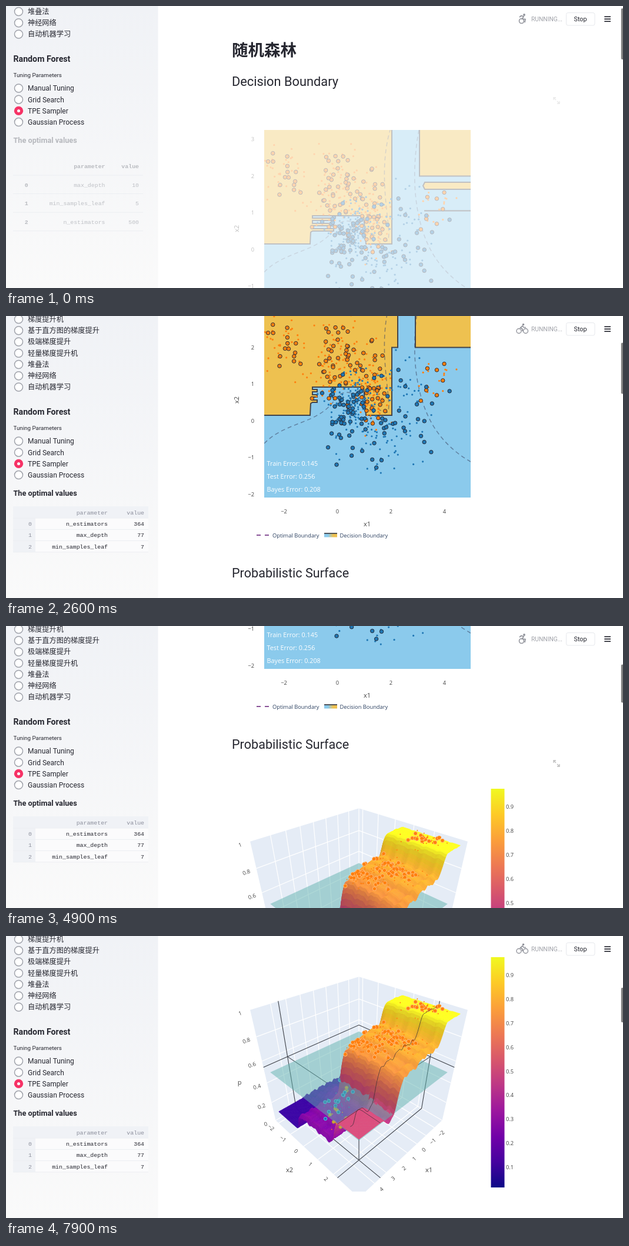
Write an HTML page with a canvas that moves like this. It is 1049 by 480 pixels and loops after 8000 ms.

```html
<!DOCTYPE html>
<html lang="zh-CN">
<head>
<meta charset="utf-8">
<title>Random Forest</title>
<style>
html, body { margin: 0; width: 100%; height: 100%; overflow: hidden; background: #fff; }
canvas { display: block; }
</style>
</head>
<body>
<canvas id="stage" width="1049" height="480"></canvas>
<script>
const W = 1049, H = 480, LOOP = 8000;
const INK = '#262730', ORANGE = '#ff7f0e', BLUE = '#1f77b4', SKY = '#8bcaec', SAND = '#eec150', EDGE = '#43454b';
const SANS = 'Roboto, sans-serif';
const PLOT = '"Open Sans", sans-serif';
const MONO = '"Liberation Mono", monospace';
const CJK = '"Noto Sans CJK SC", "Noto Sans CJK", sans-serif';
const SMALL = '9.3px ' + PLOT, AXIS = '11px ' + PLOT, LABEL = '#444';
const TAU = Math.PI * 2;
const stage = document.getElementById('stage').getContext('2d');

function layer(height) {
  const c = document.createElement('canvas');
  c.width = W;
  c.height = height;
  return c.getContext('2d');
}

function text(g, s, x, y, font, color = INK, align = 'left', angle = 0) {
  g.save();
  g.translate(x, y);
  g.rotate(angle);
  g.font = font;
  g.fillStyle = color;
  g.textAlign = align;
  g.fillText(s, 0, 0);
  g.restore();
}

function trace(g, pts) {
  g.beginPath();
  for (const [x, y] of pts) g.lineTo(x, y);
}

function line(g, pts, color, width = 1) {
  trace(g, pts);
  g.strokeStyle = color;
  g.lineWidth = width;
  g.stroke();
}

const across = (g, x1, x2, y, color, width) => line(g, [[x1, y], [x2, y]], color, width);

function fillPath(g, pts, color) {
  trace(g, pts);
  g.fillStyle = color;
  g.fill();
}

function box(g, x, y, w, h, color) {
  g.fillStyle = color;
  g.fillRect(x, y, w, h);
}

function dot(g, x, y, r, fill, stroke, width = 1) {
  g.beginPath();
  g.arc(x, y, r, 0, TAU);
  if (fill) { g.fillStyle = fill; g.fill(); }
  if (stroke) { g.strokeStyle = stroke; g.lineWidth = width; g.stroke(); }
}

const range = (from, to, step = 1) =>
  Array.from({ length: Math.floor((to - from) / step + 1.001) }, (_, i) => from + i * step);
const signed = v => String(v).replace('-', '−');
const mix = (u, v, t) => u + (v - u) * t;

// ---- sample points, in plot pixels ----
let seed = 11;
function rnd() {
  seed = (seed * 1664525 + 1013904223) >>> 0;
  return (seed + .5) / 4294967296;
}
const gauss = () => Math.sqrt(-2 * Math.log(rnd())) * Math.cos(TAU * rnd());

const points = [];
function cluster(color, count, x, y, sx, sy) {
  for (let i = 0; i < count * 3.2; i++)
    points.push({ x: x + sx * gauss(), y: y + sy * gauss(), color, big: i < count });
}
cluster(ORANGE, 14, 470, 285, 18, 28);
cluster(ORANGE, 46, 565, 315, 26, 38);
cluster(ORANGE, 32, 623, 368, 14, 28);
cluster(ORANGE, 7, 727, 345, 14, 24);
cluster(BLUE, 44, 585, 387, 21, 25);
cluster(BLUE, 30, 628, 442, 34, 38);
cluster(BLUE, 14, 680, 360, 24, 30);

// ---- decision boundary chart ----
const LEFT = 439, TOP = 211, RIGHT = 790, BOTTOM = 545;
const xPix = v => 563.5 + 45.5 * v, yPix = v => 414.4 - 62.5 * v;

function region(g, corner, edge) {
  fillPath(g, [corner, ...edge], SAND);
  line(g, edge, EDGE, 2);
}

// Stepped boundary: the gap between the upper regions, then a toothed inlet below.
function regions(g, stale) {
  const gapLeft = stale ? 656 : 666, gapRight = stale ? 703 : 696, tooth = stale ? 36 : 8;
  const [step, floor, roof] = [yPix(2), yPix(.15), yPix(.92)];
  const inlet = range(361, 379, 9).flatMap(y => [[521, y], [521 + tooth, y], [521 + tooth, y + 4], [521, y + 4]]);
  region(g, [LEFT, TOP], [[gapLeft, TOP], [gapLeft, step], [656, step], [656, floor], [612, floor],
    [608, roof], [521, roof], ...inlet, [518, 385], [517, floor], [LEFT, floor]]);
  region(g, [RIGHT, TOP], [[gapRight, TOP], [gapRight, step], [RIGHT, step]]);
  if (stale) {
    region(g, [RIGHT, 312], [[RIGHT, 300], [712, 300], [709, 306], [712, 312], [RIGHT, 312]]);
    across(g, 711, RIGHT, 348.5, EDGE, 2);
  }
}

function expandIcon(g, x, y) {
  for (const s of [-1, 1]) {
    const at = (dx, dy) => [x + s * dx, y + s * dy];
    line(g, [at(5, 1), at(5, 5), at(1, 5)], '#bbb', 1.3);
    line(g, [at(5, 5), at(1, 1)], '#bbb', 1.3);
  }
}

function makeChart(stale) {
  const g = layer(720);
  g.save();
  g.beginPath();
  g.rect(LEFT, TOP, RIGHT - LEFT, BOTTOM - TOP);
  g.clip();
  box(g, LEFT, TOP, RIGHT - LEFT, BOTTOM - TOP, SKY);
  regions(g, stale);
  g.setLineDash([7, 5]);
  g.strokeStyle = 'rgba(60,70,100,.55)';
  g.lineWidth = 1.5;
  g.beginPath();
  g.moveTo(439, 453);
  g.bezierCurveTo(475, 415, 535, 420, 561, 375);
  g.bezierCurveTo(590, 345, 625, 400, 648, 400);
  g.bezierCurveTo(660, 390, 627, 290, 655, 205);
  g.moveTo(702, 211);
  g.bezierCurveTo(691, 270, 690, 345, 717, 405);
  g.bezierCurveTo(735, 445, 765, 470, 790, 484);
  g.stroke();
  g.setLineDash([]);
  for (const p of points) if (!p.big) dot(g, p.x, p.y, 1.6, p.color);
  for (const p of points) if (p.big) dot(g, p.x, p.y, 3.2, p.color, '#252a38');
  ['Train Error: 0.145', 'Test Error: 0.256', 'Bayes Error: 0.208'].forEach((s, i) =>
    text(g, s, 443.5, 491 + 21.8 * i, '10.8px ' + PLOT, '#fff'));
  g.restore();

  for (const v of range(-2, 3)) text(g, signed(v), 422, yPix(v) + 3.5, SMALL, LABEL, 'right');
  for (const v of range(-2, 4, 2)) text(g, signed(v), xPix(v), 571.5, SMALL, LABEL, 'center');
  text(g, 'x1', 614, 594, AXIS, LABEL, 'center');
  text(g, 'x2', 396, 379, AXIS, LABEL, 'center', -Math.PI / 2);
  for (const x of [426, 440]) across(g, x, x + 7, 609, '#7b3f8c', 1.8);
  text(g, 'Optimal Boundary', 453, 612.7, SMALL, '#2a3f5f');
  const swatch = g.createLinearGradient(541, 0, 563, 0);
  swatch.addColorStop(.3, SKY);
  swatch.addColorStop(.7, SAND);
  box(g, 541, 606, 22, 6.5, swatch);
  across(g, 541, 563, 606, EDGE, 1.8);
  text(g, 'Decision Boundary', 567.5, 612.7, SMALL, '#2a3f5f');
  expandIcon(g, 936, 161);
  return g.canvas;
}

// ---- probability surface ----
const PLASMA = ['0d0887', '46039f', '7201a8', '9c179e', 'bd3786', 'd8576b', 'ed7953', 'fb9f3a', 'fdca26', 'f0f921']
  .map(h => [0, 2, 4].map(i => parseInt(h.slice(i, i + 2), 16)));
function plasma(p, shade = 1) {
  const t = Math.min(.9999, Math.max(0, (p - .02) / .96)) * 9, i = Math.floor(t);
  return `rgb(${PLASMA[i].map((c, k) => Math.min(255, Math.round(mix(c, PLASMA[i + 1][k], t - i) * shade)))})`;
}

// Perspective view of the unit cube from its (1,1,1) diagonal.
function project([a, b, p]) {
  const x = a - .5, y = b - .5, z = p - .5;
  const k = 491 / (2.165 - (x + y + z) / Math.sqrt(3));
  return [600 + k * (y - x) / Math.SQRT2, 232 - k * (2 * z - x - y) / Math.sqrt(6)];
}
const path3d = (...corners) => corners.map(project);
const aOf = px => .03 + .94 * (px - LEFT) / (RIGHT - LEFT);
const bOf = py => .97 - .94 * (py - TOP) / (BOTTOM - TOP);
const rise = (x, at, w = .012) => 1 / (1 + Math.exp((at - x) / w));

// Probability: a stepped slope along a, cut off where b is low, with fine ridges along both axes.
function surface(a, b) {
  const far = rise(a, .73), top = rise(b, .75), south = 1 - rise(b, .33), lower = rise(a, .22);
  const ridge = .009 * (Math.sin(75 * a) + Math.sin(62 * b)) + .006 * (Math.sin(141 * a) + Math.sin(117 * b));
  let north = .97 - .17 * lower - .04 * rise(a, .45);
  north = mix(north, .3 + .13 * top, rise(a, .64, .018));
  north = mix(north, .28 + .23 * top, far);
  const hill = .1 + .16 * Math.exp(-(((a - .52) / .15) ** 2)) * rise(b, .2, .06);
  const p = mix(hill, north, rise(b, .43 - .1 * rise(a, .7), .01));
  return Math.min(.97, p + ridge * mix(.3, 1, lower) * (1 - far * Math.min(1, top + south)));
}

const N = 110;
const at = i => .03 + .94 * i / N;
const vertex = (i, j) => [at(i), at(j), surface(at(i), at(j))];

function sheet(g, above) {
  for (let i = 0; i < N; i++) for (let j = 0; j < N; j++) {
    const quad = [vertex(i, j), vertex(i + 1, j), vertex(i + 1, j + 1), vertex(i, j + 1)];
    const [p, q, r, s] = quad.map(v => v[2]);
    const mean = (p + q + r + s) / 4;
    if (mean >= .495 !== above) continue;
    const shade = 1.08 - Math.min(.26, Math.max(0, (p - q) * 6) + Math.abs(p - s) * 2);
    const color = plasma(mean, shade), outline = path3d(...quad);
    fillPath(g, outline, color);
    line(g, [...outline, outline[0]], color, .7);
  }
}

function scatter(g, above) {
  for (const d of points) {
    const a = aOf(d.x), b = bOf(d.y), p = surface(a, b), blue = d.color === BLUE;
    if (p >= .5 !== above || a < .03 || b > .97) continue;
    if (above ? blue || p < .65 : b < .38 || a < .5) continue;
    const [x, y] = project([a, b, p + .015]);
    if (!d.big) dot(g, x, y, 1, d.color);
    else if (above) dot(g, x, y, 3.2, ORANGE, '#ffc48c', .8);
    else dot(g, x, y, 2.8, blue ? BLUE : '#d9a32b', blue ? '#4ec5e8' : '#9a8a55');
  }
}

function spikes(g, [a, b, p]) {
  const spike = (...c) => line(g, path3d(...c), '#3c3f46', 1.1);
  spike([a, 0, 1], [a, 0, 0], [a, 1, 0]);
  spike([0, b, 1], [0, b, 0], [1, b, 0]);
  spike([1, 0, p], [0, 0, p], [0, 1, p]);
  spike([a, 0, p], [a, b, p], [0, b, p]);
  spike([a, b, p], [a, b, 0]);
}

function makeSurface(hovered) {
  const g = layer(H), hover = [.79, .79, .545];
  g.save();
  g.beginPath();
  g.rect(0, 0, W, 435);
  g.clip();
  fillPath(g, path3d([1,0,1], [0,0,1], [0,1,1], [0,1,0], [1,1,0], [1,0,0]), '#e5ecf6');

  // each grid line comes with the tick label at its open end
  const grid = (...c) => line(g, path3d(...c), '#fff', 1.2);
  const tick = (s, corner, dx, dy, angle) => {
    const [x, y] = project(corner);
    text(g, signed(s), x + dx, y + dy + 3.5, SMALL, LABEL, 'center', angle);
  };
  for (const v of range(-2, 4)) {
    const a = aOf(xPix(v));
    grid([a, 0, 1], [a, 0, 0], [a, 1, 0]);
    tick(v, [a, 1, 0], 14, 9, -.72);
  }
  for (const v of range(-2, 2)) {
    const b = bOf(yPix(v));
    grid([0, b, 1], [0, b, 0], [1, b, 0]);
    tick(v, [1, b, 0], -15, 7, .72);
  }
  for (const v of range(0, 5)) {
    const p = v / 5;
    grid([1, 0, p], [0, 0, p], [0, 1, p]);
    tick(p, [1, 0, p], -16, 6, -.32);
  }
  grid([0, 0, 0], [0, 0, 1]);
  if (hovered) spikes(g, hover);

  sheet(g, false);
  scatter(g, false);
  fillPath(g, path3d([.97,.03,.5], [.03,.03,.5], [.03,.97,.5], [.97,.97,.5]), 'rgba(98,180,176,.5)');
  sheet(g, true);
  scatter(g, true);
  if (hovered) {
    const [a, b] = hover, steps = range(0, N).map(at);
    const contour = pts => line(g, pts.map(project), 'rgba(50,45,50,.7)');
    contour(steps.map(s => [s, b, surface(s, b)]));
    contour(steps.filter(s => s > .7).map(s => [a, s, surface(a, s)]));
  }
  text(g, 'p', 397, 253, AXIS, LABEL, 'center');
  text(g, 'x2', 482, 402, AXIS, LABEL, 'center');
  text(g, 'x1', 719, 402, AXIS, LABEL, 'center');
  g.restore();

  const bar = g.createLinearGradient(0, 428, 0, 36);
  for (const i of range(0, 9)) bar.addColorStop(i / 9, plasma(.02 + .96 * i / 9));
  box(g, 824.5, 36, 23, 392, bar);
  for (const i of range(1, 9)) text(g, '0.' + i, 850, 437.5 - 40.8 * i, SMALL, LABEL);
  return g.canvas;
}

// ---- page parts ----
const MODELS = ['梯度提升机', '基于直方图的梯度提升', '极端梯度提升', '轻量梯度提升机', '堆叠法', '神经网络', '自动机器学习'];
const TUNING = ['Manual Tuning', 'Grid Search', 'TPE Sampler', 'Gaussian Process'];
const STALE_ROWS = [['max_depth', 10], ['min_samples_leaf', 5], ['n_estimators', 500]];
const ROWS = [['n_estimators', 364], ['max_depth', 77], ['min_samples_leaf', 7]];

function radio(g, y, label, font, on) {
  if (on) {
    dot(g, 21.5, y, 7.7, '#f63366');
    dot(g, 21.5, y, 2.5, '#fff');
  } else dot(g, 21.5, y, 7, '#fff', '#a0a3ab', 1.5);
  text(g, label, 37, y + 4.4, font);
}

function table(g, updated) {
  const mono = '9.9px ' + MONO, bold = 'bold ' + mono;
  const gray = updated ? '#8c8f9c' : '#b9bbc0', ink = updated ? INK : '#bfc1c6';
  const head = updated ? mono : bold, shift = updated ? 0 : 9;
  const first = updated ? 357 : 307.5, step = updated ? 19.3 : 31.6;
  if (updated) {
    box(g, 12, 324, 230, 78, '#fbfbfc');
    box(g, 12, 324, 230, 20, '#f0f2f6');
    box(g, 12, 324, 38, 78, '#f0f2f6');
  }
  const rules = updated ? first - 13 : first - 19.5;
  for (const i of range(0, 3)) across(g, 12, 242 - shift, rules + step * i, '#eceef2');
  const right = (s, x, y, font, color) => text(g, s, x, y, font, color, 'right');
  right('parameter', 173 - shift / 2, updated ? 338 : 276, head, gray);
  right('value', 235 - shift, updated ? 338 : 276, head, gray);
  (updated ? ROWS : STALE_ROWS).forEach(([name, value], i) => {
    const y = first + step * i;
    right(i, 44 - shift * .7, y, head, gray);
    right(name, 173 - shift / 2, y, mono, ink);
    right(value, 235 - shift, y, mono, ink);
  });
}

function sidebar(g, updated) {
  const shift = updated ? 73 : 0;
  const bg = g.createLinearGradient(0, 0, 0, H);
  bg.addColorStop(0, '#f0f2f6');
  bg.addColorStop(1, '#fafafa');
  box(g, 0, 0, 258.5, H, bg);
  MODELS.forEach((s, i) => radio(g, 48 + shift - 19.25 * (6 - i), s, '12.2px ' + CJK));
  text(g, 'Random Forest', 12.5, 94.8 + shift, 'bold 14.2px ' + SANS);
  text(g, 'Tuning Parameters', 12.5, 121 + shift, '9.8px ' + SANS);
  TUNING.forEach((s, i) => radio(g, 140 + shift + 19.2 * i, s, '12px ' + SANS, i === 2));
  text(g, 'The optimal values', 12.5, 233.3 + shift, 'bold 12.7px ' + SANS, updated ? INK : '#b6b8bd');
  table(g, updated);
}

const GRAY = '#91939b';
const limb = (g, ...pts) => line(g, pts, GRAY, 1.7);
const SPORTS = [
  function cycling(g) {
    for (const x of [872, 883.5]) dot(g, x, 25.5, 4, null, GRAY, 1.4);
    dot(g, 879.5, 14.5, 1.8, GRAY);
    limb(g, [878, 26], [878, 22], [874.5, 20], [878, 17], [880.5, 19.5], [884, 19.5]);
  },
  function swimming(g) {
    dot(g, 882, 18.5, 2, GRAY);
    limb(g, [872, 16], [876, 14.5], [880, 21]);
    for (const y of [23, 27.5]) limb(g, ...range(869, 887).map(x => [x, y + Math.cos((x - 869) * TAU / 6)]));
  },
  function wheelchair(g) {
    dot(g, 881, 15, 1.9, GRAY);
    dot(g, 876.5, 25.5, 4, null, GRAY, 1.6);
    limb(g, [873, 19], [876, 16.5], [880, 18], [877.5, 22], [883, 22.5], [882, 28]);
  }
];

function header(g, time) {
  const turn = (time - 1325) / 1270;
  SPORTS[Math.floor((turn - Math.floor(turn)) * SPORTS.length)](g);
  text(g, 'RUNNING...', 893, 26, '10.3px ' + SANS, '#a0a2a9');
  g.beginPath();
  g.roundRect(952.5, 11.5, 48.5, 21.5, 3);
  g.fillStyle = '#fff';
  g.fill();
  g.strokeStyle = '#e6e8ec';
  g.lineWidth = 1;
  g.stroke();
  text(g, 'Stop', 976.5, 25.7, '10.8px ' + SANS, INK, 'center');
  for (const y of [18.2, 22.2, 26.2]) across(g, 1017.3, 1028, y, INK, 1.7);
}

// ---- timeline ----
const ease = (t, from, to) => {
  const u = Math.min(1, Math.max(0, (t - from) / (to - from)));
  return u * u * (3 - 2 * u);
};
const scrollAt = t => 236 * ease(t, 1900, 2600) + 236 * ease(t, 3900, 4100)
  + 144 * ease(t, 5100, 5500) + 97 * ease(t, 6300, 6500);

function scrollbar(g, scroll, time) {
  const length = time < 4100 ? 87 : time < 5300 ? 65 : 59;
  g.beginPath();
  g.roundRect(1045.8, 4 + scroll * (length - 2.5) / H, 4, length, 2);
  g.fillStyle = '#7f7f7f';
  g.fill();
}

const staleChart = makeChart(true), chart = makeChart(false);
const plainSurface = makeSurface(false), hoverSurface = makeSurface(true);

function draw(t) {
  const g = stage;
  const origin = t < 3900 ? 0 : 3900;
  const time = origin + Math.floor((t - origin) / 200) * 200;
  const scroll = Math.round(scrollAt(time));
  box(g, 0, 0, W, H, '#fff');
  g.save();
  g.translate(0, -scroll);
  text(g, '随机森林', 384, 85, 'bold 27.5px ' + CJK);
  text(g, 'Decision Boundary', 384, 136.3, '21.8px ' + SANS);
  const stale = time < 600;
  g.globalAlpha = stale ? .33 : 1;
  g.drawImage(stale ? staleChart : chart, 0, 0);
  g.globalAlpha = 1;
  text(g, 'Probabilistic Surface', 384, 680.5, '21.6px ' + SANS);
  if (time >= 4100) g.drawImage(time >= 7700 ? hoverSurface : plainSurface, 0, 713);
  if (time >= 4500) expandIcon(g, 936, 706);
  g.restore();
  sidebar(g, time >= 2000);
  header(g, time);
  scrollbar(g, scroll, time);
}

let start;
function loop(now) {
  start ??= now;
  draw((now - start) % LOOP);
  requestAnimationFrame(loop);
}
requestAnimationFrame(loop);
</script>
</body>
</html>
```
